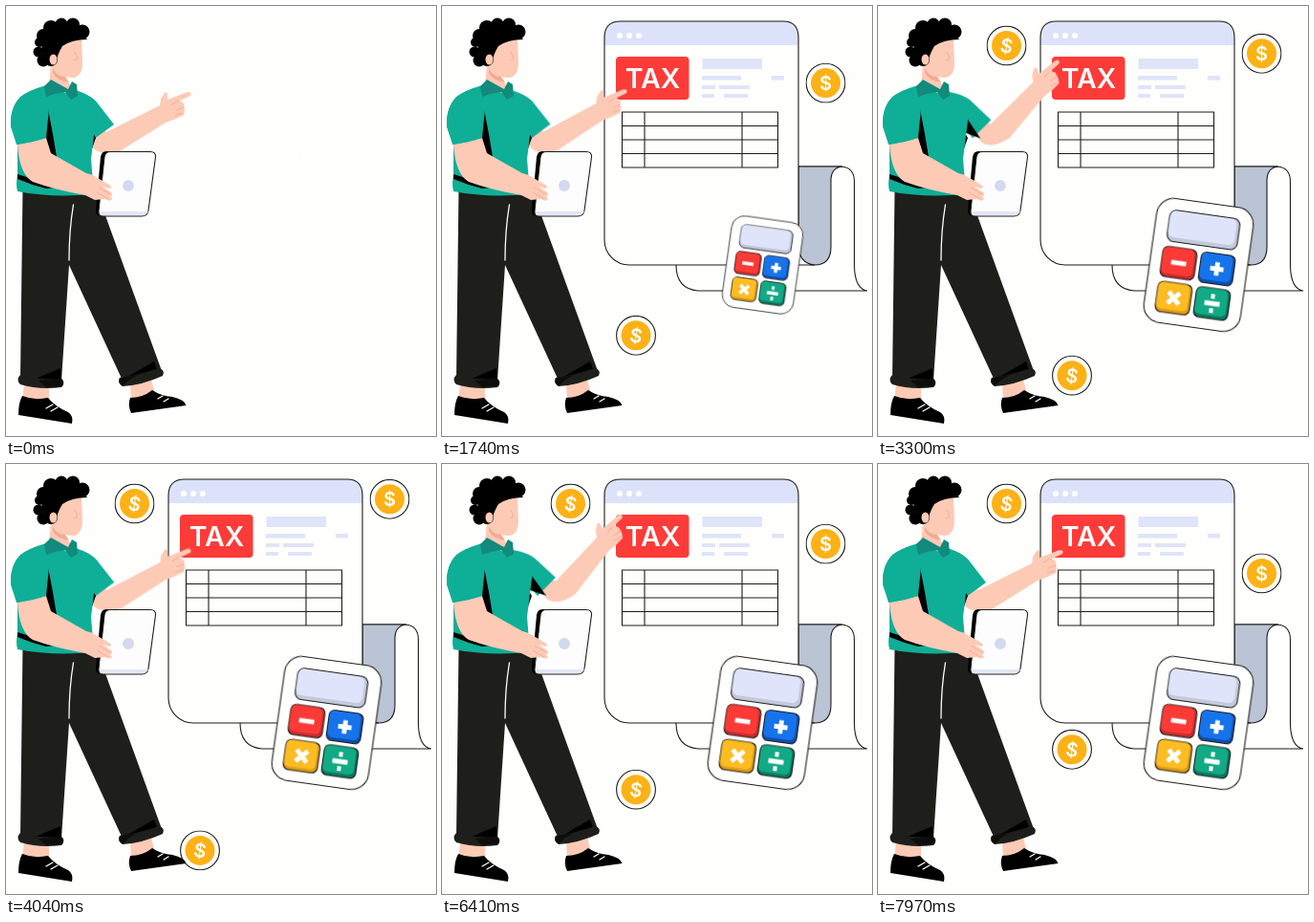
Recreate the animation shown at these times as an HTML page. Size 450 px wide and 450 px high, loop 8000 ms.

```html
<!DOCTYPE html>
<html lang="en">
<head>
<meta charset="utf-8">
<title>Tax</title>
<style>
  html, body { margin: 0; width: 100%; height: 100%; overflow: hidden; background: #fefefc; }
  svg { display: block; width: 100vw; height: 100vh; }
  text { font-family: Inter, Roboto, sans-serif; font-weight: 600; fill: #fff; text-anchor: middle; }
  .pop { transform-box: fill-box; transform-origin: center; }
  .swing { transform-origin: 85px 87px; }
  .paper { fill: #fefefc; }
  .ink { stroke: #1c1c1a; stroke-width: 1.1; }
  .bar { fill: #e0e4f8; }
  .skin { fill: #fdcab6; }
  .shirt { fill: #0fae96; }
  .pants { fill: #1e1f1b; }
  .crease { fill: none; stroke: #f0a890; stroke-width: .8; }
  .lace { fill: none; stroke: #fff; stroke-width: 1.3; stroke-linecap: round; }
</style>
</head>
<body>
<svg viewBox="0 0 450 450">
  <g id="doc" class="pop">
    <path class="paper ink" d="M373 168H418Q431.500 169 431.500 184V272Q432 296 445 298H268Q245 296 245 271Z"/>
    <path class="ink" fill="#bac4d4" d="M373 168H419Q407 169 407 183V252Q407 271 390 271Q373 271 373 250Z"/>
    <path class="paper" d="M170 33Q170 16 187 16H357Q373 16 373 33V250Q373 269 390 271H196A26 26 0 0 1 170 245Z"/>
    <path fill="#dbe2fa" d="M170 41V33Q170 16 187 16H357Q373 16 373 33V41Z"/>
    <path class="ink" fill="none" d="M390 271H196A26 26 0 0 1 170 245V33Q170 16 187 16H357Q373 16 373 33V250Q373 269 390 271"/>
    <g fill="#fff"><circle cx="186" cy="31" r="3"/><circle cx="196" cy="31" r="3"/><circle cx="206" cy="31" r="3"/></g>
    <g class="bar">
      <rect x="272.500" y="55" width="62.500" height="11"/>
      <rect x="272" y="73" width="41" height="4.500"/>
      <rect x="345" y="73" width="13" height="4.500"/>
      <rect x="272" y="83" width="14" height="4"/>
      <rect x="290" y="83" width="32" height="4"/>
      <rect x="272" y="92" width="13" height="4"/>
      <rect x="295" y="92" width="25" height="4"/>
    </g>
  </g>

  <g id="table" class="pop">
    <path class="ink" fill="none" d="M188.500 111H351.500V169H188.500ZM188.500 125.500H351.500M188.500 140H351.500M188.500 154.500H351.500M212 111V169M314 111V169"/>
  </g>

  <g id="tax" class="pop">
    <rect x="182" y="53" width="76.500" height="45" rx="4" fill="#fd3b38"/>
    <text x="220.500" y="85.500" font-size="28.500">TAX</text>
  </g>

  <g id="calc" class="pop">
    <g transform="translate(335.500 271) rotate(8)">
      <rect class="paper ink" x="-51" y="-65.500" width="102" height="131" rx="18"/>
      <rect class="ink" x="-37" y="-53.500" width="74" height="33" rx="7" fill="#c3c8da"/>
      <rect x="-36.500" y="-53" width="70" height="28" rx="6" fill="#dfe4fa"/>
      <g id="keys"></g>
    </g>
  </g>

  <g id="coins"></g>

  <g id="man">
    <g id="forearm" class="swing">
      <path class="skin" d="M86 118L105 132L161 104L162 97L166 91Q169 89 169 93L169 98L190 90Q195 90 193 94L182 99L186 102L187 109L186 114L178 118L167 122L119 152Q97 158 89 146Z"/>
      <path class="crease" d="M181 99L173 103M186 106L178 109M185 112L177 114"/>
    </g>
    <g id="sleeve" class="swing">
      <path class="shirt" d="M66 86Q89 92 96 102L113 124L91 140L76 110Z"/>
    </g>
    <g id="underarm" class="swing">
      <path d="M81 111L90 143L74 130Z"/>
    </g>

    <path d="M91 133L94 138L89 152L86 150Z"/>
    <path class="skin" d="M19 396H45V412H17ZM130 396L152 391L156 406L131 414Z"/>
    <path d="M17 408Q29 413 44 410Q51 419 65 425Q71 429 69 437L13 428Q13 415 17 408Z"/>
    <path d="M130 410Q143 410 153 402Q162 408 174 409Q187 412 188.500 418L131 426Q127 418 130 410Z"/>
    <path class="lace" d="M42 421L49 417M47 424L54 420M159 411L164 408M165 414L170 411"/>

    <path class="pants" d="M17.500 190L92 194L97 200L163 382L122 392L66 271L58 392L15 390Z"/>
    <path d="M31 390L57 379L58 392ZM122 391L155 372L159 383Z"/>
    <path class="lace" d="M70.500 208Q66 235 66 266"/>
    <path class="pants" d="M15 386Q35 392 58 390Q63 394 58 399Q35 402 15 396Q10 391 15 386ZM119 389Q140 386 160 379Q167 381 164 387Q142 397 122 398Q116 394 119 389Z"/>
    <path d="M34 392L58 390Q62 394 58 398L42 399ZM119 389L138 386L128 392L122 398Q116 394 119 389Z" opacity=".55"/>

    <path class="shirt" d="M42 83Q24 88 15 95Q4 106 5 126L12 146L12 178Q10 186 12 194Q48 201 92 197L89 160L96 104Q91 93 73 90Z"/>
    <path d="M44 108L49 134L53 158L46 154L41 138ZM12 176L31 182L52 190L42 191Q26 187 12 181Z"/>

    <path class="skin" d="M47 40L79 33L80 61Q79 75 69 75L62 74L69 86L64 92L45 82L47 61Z"/>
    <path class="crease" d="M72 48L75 55L71 57"/>
    <path fill="#f2ab92" d="M49 66Q54 74 62 74L66 80Q53 78 49 70Z"/>
    <path fill="#128a7c" d="M47 77L40 84L42 95L51 92L62 90L68 98L75 94L74 82L69 79L65 87Z"/>
    <g id="hair">
      <path d="M36 36L46 21L72 18L85 35Q69 35 59 42Q54 50 52 60L41 60Z"/>
    </g>
    <ellipse class="skin" cx="49.500" cy="56" rx="4" ry="5.500"/>

    <path d="M105 152H150L148 156L104 220H100Q93 220 94 213L99 158Q100 152 105 152Z"/>
    <path class="ink" fill="#fdfdfd" d="M109 152.500H151Q157 152.500 156.500 158L149 214Q148 220 142 220H102Q96 220 97 214L103 158Q104 152.500 109 152.500Z"/>
    <path fill="#e3e7f6" d="M98 215H149Q147 219 142 219H102Q98 219 98 215Z"/>
    <circle cx="128" cy="188" r="6" fill="#d3d9ee"/>

    <path class="skin" d="M12 145L42 138L47 154L84 175Q90 176 94 179L108 187Q112 190 108 191L101 189L110 195Q113 198 109 199L111 202Q109 205 104 202L93 203L83 198Q50 192 28 184Q14 176 12 145Z"/>
    <path class="crease" d="M97 190L109 197M95 195L107 202"/>
    <path class="shirt" d="M22 92Q4 101 5 126L11 145Q28 143 42 138L45 108L40 88Z"/>
  </g>
</svg>
<script>
const LOOP = 8000, NS = 'http://www.w3.org/2000/svg';
const byId = id => document.getElementById(id);

function add(parent, tag, attrs, text) {
  const el = document.createElementNS(NS, tag);
  for (const k in attrs) el.setAttribute(k, attrs[k]);
  if (text) el.textContent = text;
  return parent.appendChild(el);
}

for (const [cx, cy, r] of [[58, 19, 6.5], [70, 19.5, 7], [80, 27, 7.5], [47, 23, 8],
  [39, 31, 7], [35, 38, 5], [34, 48, 5.5], [39, 57, 6.5], [47, 56, 7]])
  add(byId('hair'), 'circle', { cx, cy, r });

// Calculator keys: centre, face colour, shade, symbol
const keys = [
  [-21, 1, '#fb3a36', '#c92a2c', 'M-8 0H8'],
  [19.5, 1.5, '#1673ea', '#0d4fb0', 'M-7 0H7M0 -7V7'],
  [-21, 38, '#fdbc22', '#dc9a14', 'M-6 -6L6 6M6 -6L-6 6'],
  [19.5, 38, '#12a985', '#08785c', 'M-8 0H8M-2 -7.500H2M-2 7.500H2']
];
for (const [x, y, face, shade, d] of keys) {
  const g = add(byId('keys'), 'g', { transform: `translate(${x} ${y})` });
  add(g, 'rect', { x: -18, y: -16, width: 36, height: 32, rx: 6, fill: shade, class: 'ink' });
  add(g, 'rect', { x: -17.5, y: -15.5, width: 33, height: 28, rx: 5, fill: face });
  add(g, 'path', { d, fill: 'none', stroke: '#fff', 'stroke-width': 4.8 });
}

// Times in ms become offsets within the loop
function play(el, steps) {
  el.animate(steps.map(([ms, transform, easing = 'linear']) =>
    ({ offset: ms / LOOP, transform, easing })), { duration: LOOP, iterations: Infinity });
}

function pop(el, start, rise = 300, settle = 300) {
  const steps = [
    [start, 'scale(0)', 'ease-out'],
    [start + rise, 'scale(1.13)', 'ease-in-out'],
    [start + rise + settle, 'scale(1)'],
    [LOOP, 'scale(1)']
  ];
  if (start) steps.unshift([0, 'scale(0)']);
  play(el, steps);
}

function coin(x, from, to, start, tilt) {
  const g = add(byId('coins'), 'g', {}), c = add(g, 'g', { class: 'pop' });
  add(c, 'circle', { r: 20.4, class: 'paper ink' });
  add(c, 'circle', { r: 15.5, fill: '#fcb216' });
  add(c, 'text', { y: 7.3, 'font-size': 20, transform: `rotate(${tilt})` }, '$');
  const at = y => `translate(${x}px, ${y}px)`;
  play(g, [[0, at(from)], [LOOP / 2, at(to)], [LOOP, at(from)]]);
  pop(c, start);
}

function swing(id, angle) {
  byId(id).animate([
    { transform: 'rotate(0deg)', easing: 'ease' },
    { transform: `rotate(${angle}deg)`, easing: 'cubic-bezier(.35,.05,.3,1)' },
    { transform: 'rotate(0deg)' }
  ], { duration: LOOP / 4, iterations: Infinity });
}

pop(byId('doc'), 0);
pop(byId('tax'), 550);
pop(byId('table'), 1050);
pop(byId('calc'), 1600);
coin(401.5, 115, 36, 200, 0);
coin(203, 298, 405.5, 200, 9);
coin(134.5, 41.5, 41.5, 2600, 9);
swing('forearm', -29);
swing('sleeve', -14);
swing('underarm', -29);
</script>
</body>
</html>
```
